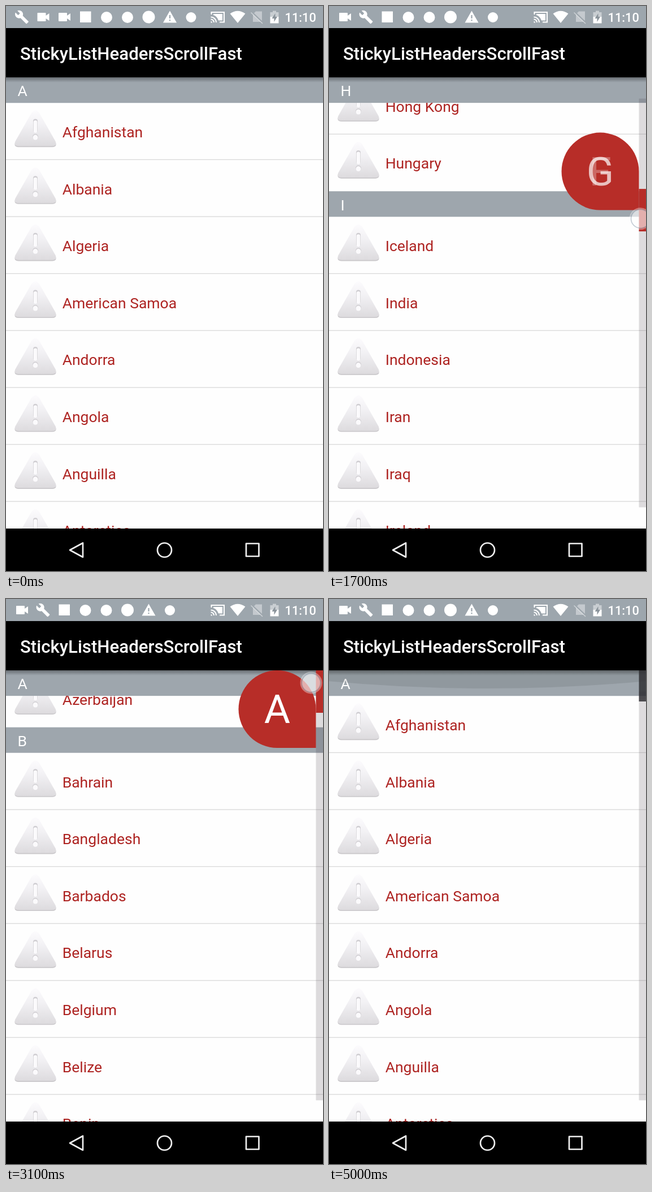
An HTML page that plays this animation: 561x998 px, repeating every 5.1 s.

```html
<!DOCTYPE html>
<html lang="en">
<head>
<meta charset="utf-8">
<title>StickyListHeadersScrollFast</title>
<style>
html, body { margin: 0; width: 100%; height: 100%; overflow: hidden; background: #000; }
svg { display: block; width: 561px; height: 998px; font-family: Roboto, sans-serif; }
.row { font-size: 26.5px; fill: #ae2422; }
.letter { font-size: 26.5px; fill: #fff; }
.big { font-size: 71px; fill: #fff; text-anchor: middle; }
.icons { fill: #fff; }
.nav { fill: none; stroke: #eee; stroke-width: 2.7; stroke-linejoin: round; }
</style>
</head>
<body>
<svg viewBox="0 0 561 998">
  <defs>
    <clipPath id="view"><rect y="126" width="561" height="797"/></clipPath>
    <linearGradient id="grey" x1="0" y1="0" x2="0" y2="1">
      <stop offset="0" stop-color="#fcfbfd"/>
      <stop offset=".4" stop-color="#f2f1f4"/>
      <stop offset="1" stop-color="#dddbde"/>
    </linearGradient>
    <linearGradient id="shade" x1="0" y1="0" x2="0" y2="1">
      <stop offset="0" stop-opacity=".34"/>
      <stop offset="1" stop-opacity="0"/>
    </linearGradient>
    <g id="sign">
      <path id="tri" transform="translate(0 1.6)" fill="#c9c7ca" d="M45 18Q52 9 59 18L87.500 68Q91 76 82 76.500H22Q13 76 16.500 68Z"/>
      <path fill="url(#grey)" d="M45 18Q52 9 59 18L87.500 68Q91 76 82 76.500H22Q13 76 16.500 68Z"/>
      <rect x="48" y="28.500" width="8" height="24" rx="4" fill="#cfcdd1"/>
      <rect x="48.700" y="31" width="6.600" height="22" rx="3.300" fill="#fbfafc"/>
      <circle cx="52" cy="60" r="5" fill="#cfcdd1"/>
      <circle cx="52" cy="61" r="4.500" fill="#fbfafc"/>
    </g>
    <path id="wrench" transform="scale(1.08)" d="M22.7 19l-9.1-9.1c.9-2.300.4-5-1.500-6.900-2-2-5-2.400-7.400-1.300L9 6 6 9 1.600 4.700C.4 7.100.9 10.100 2.900 12.100c1.900 1.900 4.600 2.400 6.900 1.500l9.100 9.100c.4.4 1 .4 1.400 0l2.300-2.300c.5-.4.5-1.100.1-1.400z"/>
    <path id="camera" d="M1 0H14Q15 0 15 1V5L21 1V14L15 10V14Q15 15 14 15H1Q0 15 0 14V1Q0 0 1 0Z"/>
    <path id="warn" fill-rule="evenodd" d="M0 21H24L12 0ZM10.900 15.500h2.200v2.300h-2.200zM10.900 7.500h2.200v6h-2.200z"/>
  </defs>

  <rect width="561" height="998" fill="#fefefe"/>
  <g clip-path="url(#view)">
    <g id="list"></g>
    <rect y="126" width="561" height="45.100" fill="#9ea6ad"/>
    <text id="sticky" class="letter" x="20.500" y="159.300">A</text>
    <path id="glow" fill="#000" fill-opacity=".085"/>
    <rect y="126" width="561" height="9" fill="url(#shade)"/>
    <g id="bar">
      <rect x="548.500" y="163.500" width="12.500" height="722" fill="#3c323c" fill-opacity=".17"/>
      <rect id="thumb" x="548.500" width="12.500"/>
    </g>
    <g id="bubble">
      <path fill="#b72d28" d="M68.500 0A68.500 68.500 0 0 1 137 68.500V137H68.500A68.500 68.500 0 0 1 68.500 0Z"/>
      <text id="oldBig" class="big" x="68.500" y="93"></text>
      <text id="newBig" class="big" x="68.500" y="93"></text>
    </g>
  </g>

  <rect width="561" height="39.500" fill="#9da6ad"/>
  <rect y="39" width="561" height="87" fill="#000"/>
  <text x="25" y="95" font-size="31.200" font-weight="500" fill="#fff">StickyListHeadersScrollFast</text>
  <g class="icons">
    <g id="before">
      <use href="#wrench" x="15" y="6.500"/>
      <use href="#camera" x="55.500" y="12"/>
      <use href="#camera" x="93" y="12"/>
    </g>
    <g id="after">
      <use href="#camera" x="18" y="12"/>
      <use href="#wrench" x="52.500" y="6.500"/>
    </g>
    <g id="shared">
      <rect x="131" y="9.500" width="19.500" height="19.500"/>
      <circle cx="178" cy="20" r="10"/>
      <circle cx="215" cy="20" r="10"/>
      <circle cx="252.500" cy="19.500" r="11"/>
      <use href="#warn" x="278" y="8.500"/>
      <circle cx="327.500" cy="20" r="9"/>
    </g>
    <g fill="none" stroke="#fff" stroke-width="2.100">
      <path d="M363.500 15V11H386V28.500H378"/>
      <path d="M362.500 19.500A9.500 9.500 0 0 1 372 29M362.500 23.500A5.500 5.500 0 0 1 368 29"/>
    </g>
    <path d="M362.500 27A2.500 2.500 0 0 1 365 29.500H362.500ZM367 14H383V25.500H376Q373.500 18 367 16Z"/>
    <path d="M410 30L396.500 13.500Q410 4 423.500 13.500Z"/>
    <path opacity=".4" d="M442 9.500H453V28H437V14.500Z"/>
    <path d="M434 10L455 30" stroke="#9da6ad" stroke-width="3"/>
    <path d="M433.500 11.500L454 31" stroke="#fff" stroke-opacity=".5" stroke-width="1.500"/>
    <path opacity=".45" d="M472 8.500H478V11H482.500V19H467.500V11H472Z"/>
    <path d="M467.500 19H482.500V30.500H467.500Z"/>
    <path fill="#8b949b" d="M476.500 13L470.500 22H474.500V28L480 19H476.500Z"/>
    <text x="493.500" y="27.800" font-size="21.800" font-weight="500">11:10</text>
  </g>

  <rect y="923" width="561" height="75" fill="#000"/>
  <g class="nav">
    <path d="M113 961L136 948.500V973.500Z"/>
    <circle cx="280.500" cy="961" r="12.500"/>
    <rect x="425" y="949.500" width="22.500" height="22.500"/>
  </g>
  <g id="touch">
    <circle r="18" fill="none" stroke="#fff" stroke-opacity=".35" stroke-width="3"/>
    <circle r="16.500" fill="#fff" fill-opacity=".62" stroke="#8093a5" stroke-opacity=".45" stroke-width="1.800"/>
  </g>
</svg>
<script>
const NAMES = `Afghanistan,Albania,Algeria,American Samoa,Andorra,Angola,Anguilla,Antarctica,Antigua and Barbuda,Argentina,Armenia,Aruba,Australia,Austria,Azerbaijan,
Bahrain,Bangladesh,Barbados,Belarus,Belgium,Belize,Benin,Bermuda,Bhutan,Bolivia,Bosnia and Herzegovina,Botswana,Bouvet Island,Brazil,British Indian Ocean Territory,British Virgin Islands,Brunei,Bulgaria,Burkina Faso,Burundi,
Cote d'Ivoire,Cambodia,Cameroon,Canada,Cape Verde,Cayman Islands,Central African Republic,Chad,Chile,China,Christmas Island,Cocos (Keeling) Islands,Colombia,Comoros,Congo,Cook Islands,Costa Rica,Croatia,Cuba,Cyprus,Czech Republic,
Democratic Republic of the Congo,Denmark,Djibouti,Dominica,Dominican Republic,
East Timor,Ecuador,Egypt,El Salvador,Equatorial Guinea,Eritrea,Estonia,Ethiopia,
Faeroe Islands,Falkland Islands,Fiji,Finland,Former Yugoslav Republic of Macedonia,France,French Guiana,French Polynesia,French Southern Territories,
Gabon,Georgia,Germany,Ghana,Gibraltar,Greece,Greenland,Grenada,Guadeloupe,Guam,Guatemala,Guinea,Guinea-Bissau,Guyana,
Haiti,Heard Island and McDonald Islands,Honduras,Hong Kong,Hungary,
Iceland,India,Indonesia,Iran,Iraq,Ireland,Israel,Italy,
Jamaica,Japan,Jordan,
Kazakhstan,Kenya,Kiribati,Kuwait,Kyrgyzstan,
Laos,Latvia,Lebanon`.split(/,\s*/);

const LOOP = 5100, STEP = 100;
const TOP = 126, ROW = 100.62, HEAD = 45.1;
const TRACK_TOP = 163.5, TRACK = 722, SECTIONS = 25;
const GRAB = 800, RELEASE = 3800;

// [time, y] of the finger on the scroll bar
const DRAG = [[700, 150], [800, 195], [900, 240], [1000, 284], [1200, 302.5], [1300, 315],
  [1800, 391], [1900, 395.5], [2000, 397.5], [2100, 403], [2200, 399], [2300, 390], [2400, 380],
  [2500, 363.5], [2600, 344], [2700, 275], [2800, 188], [2900, 163], [3100, 148], [3300, 105],
  [3500, 80], [3700, 83]];
const DRAG_X = [[700, 549], [1300, 551], [2100, 551], [2600, 543], [3100, 540], [3700, 538]];
const SWIPE_1 = [[200, 600], [300, 560], [400, 450], [500, 410]];
const SWIPE_2 = [[3900, 360], [4000, 410], [4100, 500], [4200, 600], [4300, 619]];
const SCROLL_1 = [[200, 0], [300, 40], [400, 150], [500, 220], [600, 250], [700, 256]];
const SCROLL_2 = [[3900, 1453.8], [4000, 1400], [4100, 1290], [4200, 1050], [4300, 726.8],
  [4400, 420], [4500, 180], [4600, 30], [4700, 0]];
const GLOW = [[4500, 0], [4600, 14], [4700, 34], [4800, 42], [4900, 38], [5000, 32]];

const $ = id => document.getElementById(id);
const clamp = (v, lo, hi) => Math.min(hi, Math.max(lo, v));

function at(table, t) {
  const i = table.findIndex(p => p[0] >= t);
  if (i < 0) return table[table.length - 1][1];
  if (i === 0) return table[0][1];
  const [t0, a] = table[i - 1], [t1, b] = table[i];
  return a + (b - a) * (t - t0) / (t1 - t0);
}

function add(name, attrs, text = "") {
  const el = document.createElementNS("http://www.w3.org/2000/svg", name);
  for (const k in attrs) el.setAttribute(k, attrs[k]);
  el.textContent = text;
  $("list").append(el);
}

const tops = [], letters = [], ends = [];
let y = TOP;
NAMES.forEach((name, i) => {
  tops.push(y - TOP);
  const letter = name[0];
  if (letter !== letters[letters.length - 1]) {
    letters.push(letter);
    add("rect", { y, width: 561, height: HEAD, fill: "#9ea6ad" });
    add("text", { class: "letter", x: 20.5, y: y + 33.3 }, letter);
    y += HEAD;
  }
  ends[letters.length - 1] = i;
  add("use", { href: "#sign", y });
  add("text", { class: "row", x: 99.7, y: y + 60.8 }, name);
  if (NAMES[i + 1] && NAMES[i + 1][0] === letter)
    add("rect", { y: y + ROW - 1, width: 561, height: 1.3, fill: "#d9d9d9" });
  y += ROW;
});

const thumbAt = t => clamp(at(DRAG, t - STEP), TRACK_TOP, TRACK_TOP + TRACK);
const sectionAt = t => (thumbAt(t) - TRACK_TOP) / TRACK * SECTIONS;
const letterAt = t => letters[Math.floor(sectionAt(Math.max(t, GRAB)))];

function scrollAt(t) {
  if (t < GRAB) return at(SCROLL_1, t);
  if (t >= 3900) return at(SCROLL_2, t);
  const s = sectionAt(t), i = Math.floor(s);
  return tops[Math.floor(ends[i] + (ends[i + 1] - ends[i]) * (s - i))];
}

function touchAt(t) {
  if (t >= 200 && t <= 500) return [350 + t / 50, at(SWIPE_1, t), t === 500 ? 0.15 : 1];
  if (t >= 700 && t <= RELEASE) return [at(DRAG_X, t), at(DRAG, t), t === RELEASE ? 0.3 : 1];
  if (t >= 3900 && t <= 4300) return [366 + (t - 3900) * 0.031, at(SWIPE_2, t), t === 4300 ? 0.15 : 1];
  return [0, 0, 0];
}

function place(el, x, y, opacity) {
  el.setAttribute("transform", `translate(${x} ${y})`);
  el.setAttribute("opacity", opacity);
}

function draw(t) {
  const scroll = scrollAt(t);
  place($("list"), 0, -scroll, 1);
  const first = tops.findLastIndex(v => v <= scroll + 0.01);
  $("sticky").textContent = NAMES[first][0];

  const late = t >= 300;
  place($("before"), 0, 0, late ? 0 : 1);
  place($("after"), 0, 0, late ? 1 : 0);
  place($("shared"), late ? -37.5 : 0, 0, 1);

  const held = t >= GRAB && t < RELEASE;
  const mid = thumbAt(t), thumb = $("thumb");
  thumb.setAttribute("y", held ? mid - 37.5 : TOP);
  thumb.setAttribute("height", held ? 75 : 55 + scroll * 0.0138);
  thumb.setAttribute("fill", held ? "#b72d28" : "#2d2d30");
  thumb.setAttribute("fill-opacity", held ? 1 : 0.82);
  $("bar").setAttribute("opacity", late ? 1 : 0);

  const fade = held ? 1 : t === RELEASE ? 0.5 : 0;
  place($("bubble"), 411.5, Math.max(TOP, mid - 137), fade);
  const now = letterAt(t - STEP), before = letterAt(t - 2 * STEP), same = now === before;
  $("newBig").textContent = now;
  $("newBig").setAttribute("opacity", same ? 1 : 0.7);
  $("oldBig").textContent = same ? "" : before;
  $("oldBig").setAttribute("opacity", 0.28);

  const g = at(GLOW, t);
  $("glow").setAttribute("d", `M0 ${TOP}H561V${TOP + g * 0.6}Q280.5 ${TOP + g * 1.4} 0 ${TOP + g * 0.6}Z`);
  place($("touch"), ...touchAt(t));
}

const start = performance.now();
function tick() {
  const t = (performance.now() - start) % LOOP;
  draw(Math.floor(t / STEP) * STEP);
  requestAnimationFrame(tick);
}
tick();
</script>
</body>
</html>
```
